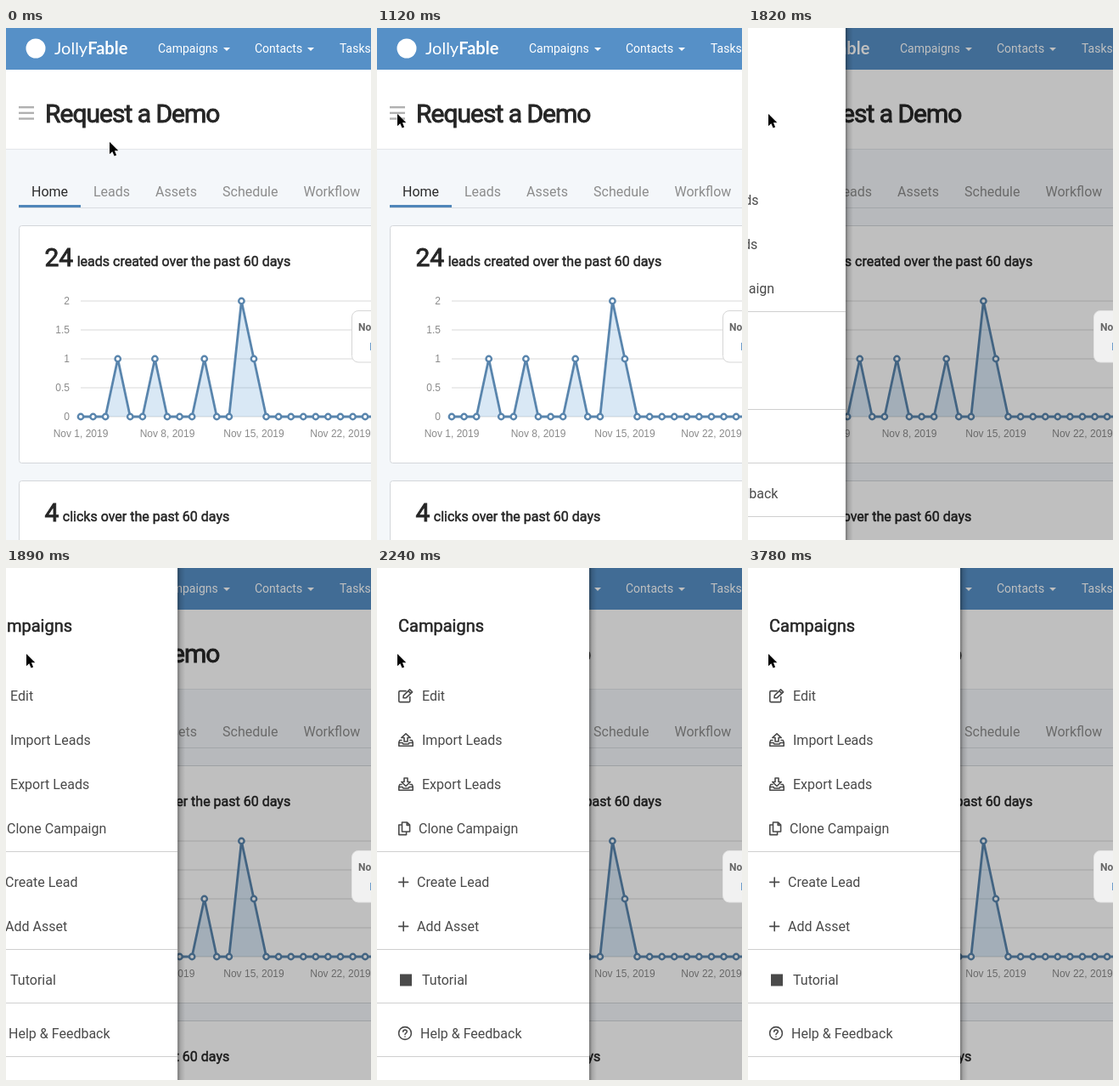
An HTML page that plays this animation: 430x602 px, repeating every 3.85 s.

```html
<!DOCTYPE html>
<html lang="en">
<head>
<meta charset="utf-8">
<title>Campaign menu</title>
<style>
  html, body { margin: 0; width: 100%; height: 100%; overflow: hidden; background: #f4f7fa; }
  svg { display: block; width: 100%; height: 100%; font-family: Roboto, sans-serif; }
  .axis { font: 12px "Liberation Sans", Arial, sans-serif; fill: #8b8b8b; }
  .brand { font: 20px Lato, sans-serif; fill: #fff; }
  .icon { fill: none; stroke: #4a4a4a; stroke-width: 1.6; stroke-linejoin: round; stroke-linecap: round; }
</style>
</head>
<body>
<svg id="stage" viewBox="0 0 430 602" xmlns="http://www.w3.org/2000/svg">
  <defs>
    <linearGradient id="edge">
      <stop offset="0" stop-opacity=".38"/>
      <stop offset=".4" stop-opacity=".13"/>
      <stop offset="1" stop-opacity="0"/>
    </linearGradient>
  </defs>
  <g id="page"></g>
  <rect id="shade" width="430" height="602" fill="#000" opacity=".25"/>
  <g id="tip">
    <rect id="tipBox" x="407.5" y="332.5" width="60" height="60.5" rx="7.5" fill="#fff" stroke="#d6d6d6"/>
    <text x="415" y="356" font-size="12" font-weight="700" fill="#666">Nov 22</text>
    <rect x="429" y="370" width="1" height="9" fill="#6d9ccb"/>
  </g>
  <g id="panel"></g>
  <path id="arrow" d="M0 0V14.2L3.3 11.2L5.6 16.5L8.1 15.4L5.9 10.2H10.3Z" fill="#000" stroke="#fff" stroke-width="1" stroke-linejoin="round" paint-order="stroke"/>
  <path id="hand" d="M3.4 10V2.2C3.4 .2 6 .2 6 2.2V6.6C6.2 5.3 8.5 5.4 8.6 6.9C9 5.9 11 6.1 11.1 7.6C11.7 6.8 13.4 7.1 13.4 8.6V12C13.4 14 12.2 14.8 12 17.3H5.4C5.2 15.2 3.2 13.6 1 11.1C-.2 9.6 1.5 8.2 2.6 9.3ZM6.6 11.5V14.5M8.6 11.5V14.5M10.6 11.5V14.5" fill="#fff" stroke="#111" stroke-width="1.1" stroke-linejoin="round"/>
</svg>
<script>
const $ = id => document.getElementById(id);

const text = (x, y, str, size, fill, extra = "") =>
  `<text x="${x}" y="${y}" font-size="${size}" fill="${fill}" ${extra}>${str}</text>`;
const strong = (x, y, str, size, weight, extra = "") =>
  text(x, y, str, size, "#262626", `stroke="#262626" stroke-width="${weight}" ${extra}`);
const rect = (x, y, w, h, fill, extra = "") =>
  `<rect x="${x}" y="${y}" width="${w}" height="${h}" fill="${fill}" ${extra}/>`;
const icon = d => `<path class="icon" d="${d}"/>`;

function navBar() {
  const caret = x => `<path d="M${x} 23h8l-4 4z" fill="#fff"/>`;
  return rect(0, 0, 430, 49, "#5690c7") +
    `<circle cx="35" cy="24" r="11.5" fill="#fff"/>` +
    `<text class="brand" x="57" y="31">Jolly<tspan font-weight="700">Fable</tspan></text>` +
    text(179, 29, "Campaigns", 14, "#fff") + caret(256) +
    text(293, 29, "Contacts", 14, "#fff") + caret(355) +
    text(393, 29, "Tasks", 14, "#fff");
}

function heading() {
  const bars = [92, 98.7, 105.4].map(y => rect(15, y, 18, 2.4, "#b0b0b0")).join("");
  return rect(0, 49, 430, 93, "#fff") + rect(0, 142, 430, 1, "#e3e6ea") + bars +
    strong(46, 111, "Request a Demo", 30, .9, 'letter-spacing="-1"');
}

function tabs() {
  const names = [["Leads", 103], ["Assets", 176], ["Schedule", 255], ["Workflow", 350.5]];
  return rect(15, 211, 415, 1, "#d9dde1") + rect(15, 208, 73, 3, "#4f86b9") +
    text(30, 198, "Home", 16, "#2b2b2b") +
    names.map(([s, x]) => text(x, 198, s, 16, "#8c8c8c")).join("");
}

function card(y, h, count, label, labelX) {
  return rect(15.5, y + .5, 440, h, "#fff", 'rx="3" stroke="#d3d6da"') +
    strong(45.5, y + 48, count, 30, .9) + strong(labelX, y + 48, label, 16, .5);
}

function chart() {
  const left = 88, step = 14.57, base = 457, unit = 68;
  const leads = { 3: 1, 6: 1, 10: 1, 13: 2, 14: 1 };
  const pts = Array.from({ length: 25 }, (_, i) => [left + i * step, base - unit * (leads[i] || 0)]);
  const line = pts.map(p => p.map(v => v.toFixed(1)).join(" ")).join("L");
  let out = "";
  for (let v = 0; v <= 2; v += .5) {
    const y = base - unit * v;
    out += rect(left, y - .5, 342, 1, "#d9d9d9") +
      `<text class="axis" x="75" y="${y + 4}" text-anchor="end">${v}</text>`;
  }
  for (let day = 1; day <= 22; day += 7)
    out += `<text class="axis" x="${left + (day - 1) * step}" y="481" text-anchor="middle">Nov ${day}, 2019</text>`;
  out += `<path d="M${line}V${base}H${left}Z" fill="#5b9bd5" fill-opacity=".23"/>` +
    `<path d="M${line}" fill="none" stroke="#5985ad" stroke-width="2.8" stroke-linejoin="round"/>`;
  return out + pts.map(([x, y]) =>
    `<circle cx="${x}" cy="${y}" r="3.2" fill="#fff" stroke="#5985ad" stroke-width="2.4"/>`).join("");
}

function menu() {
  const tray = "M29 202.5H26.8L25.8 205V209.3H42.2V205L41.2 202.5H39M25.8 205.5H30L31 207H37L38 205.5H42.2";
  const plus = y => icon(`M25.8 ${y}H36.6M31.2 ${y - 5.4}V${y + 5.4}`);
  const items = [
    ["Edit", 53, 156], ["Import Leads", 53, 208], ["Export Leads", 53, 260],
    ["Clone Campaign", 49, 312], ["Create Lead", 47, 375], ["Add Asset", 47, 427],
    ["Tutorial", 53, 490], ["Help &amp; Feedback", 51, 553]
  ];
  const shadow = rect(250, 0, 9, 602, "url(#edge)");
  return shadow + rect(-20, 0, 270, 602, "#fff") +
    strong(25, 75, "Campaigns", 20, .55) +
    items.map(([s, x, y]) => text(x, y, s, 16, "#4a4a4a")).join("") +
    [333, 448, 511, 574].map(y => rect(0, y, 250, 1, "#cfcfcf")).join("") +
    icon("M34 144.6H27.2Q25.8 144.6 25.8 146V156.2Q25.8 157.6 27.2 157.6H37.4Q38.8 157.6 38.8 156.2V151.5M31 152.8L31.3 149.8L38.6 142.9L41.6 145.8L34.2 152.6ZM37 144.6L39.8 147.4") +
    icon(tray + "M32 204V199.5H28.8L34 194.8L39.2 199.5H36V204Z") +
    `<g transform="translate(0 52)">${icon(tray + "M32 195V199.5H28.8L34 204.5L39.2 199.5H36V195Z")}</g>` +
    icon("M29.5 299H35.5L38.6 302.1V310H29.5ZM35.2 299.3V302.4H38.4M29.2 302H25.8V313.6H34.6V310.4") +
    plus(369.4) + plus(421.4) +
    rect(27, 477.5, 14, 14, "#4a4a4a") +
    `<circle class="icon" cx="33" cy="547" r="7.4"/>` +
    icon("M30.7 545.2C30.9 542.3 35.5 542.5 35.3 545.2C35.2 546.8 33 546.8 33 548.5M33 551V551.1");
}

$("page").innerHTML = navBar() + heading() + tabs() +
  card(232, 279, "24", "leads created over the past 60 days", 83.7) + chart() +
  card(532, 120, "4", "clicks over the past 60 days", 66.8);
$("panel").innerHTML = menu();

const LOOP = 3850, TICK = 70;
const HOVER = 1190, OPEN = 1820, SLIDE_FROM = 1771, SLIDE = 423;
const clamp = v => Math.min(1, Math.max(0, v));
const show = (id, on) => $(id).setAttribute("visibility", on ? "visible" : "hidden");
const move = (id, x, y) => $(id).setAttribute("transform", `translate(${x.toFixed(2)} ${y.toFixed(2)})`);

function draw(ms) {
  const t = Math.floor((ms % LOOP + .5) / TICK) * TICK;
  const open = t >= OPEN, hover = t >= HOVER && !open;

  const k = clamp(t / 1120), glide = k * k * (3 - 2 * k);
  move("arrow", 122 - 98 * glide, 134 - 33 * glide);
  move("hand", 19, 100.5);
  show("arrow", !hover);
  show("hand", hover);

  // quintic ease-out
  move("panel", -250 * (1 - clamp((t - SLIDE_FROM) / SLIDE)) ** 5, 0);
  show("panel", open);
  show("shade", open);
  $("tipBox").setAttribute("fill", open ? "#f1f1f1" : "#fff");
  $("tipBox").setAttribute("stroke", open ? "#e4e4e4" : "#d6d6d6");
}

const start = performance.now();
function loop() {
  draw(performance.now() - start);
  requestAnimationFrame(loop);
}
draw(0);
requestAnimationFrame(loop);
</script>
</body>
</html>
```
